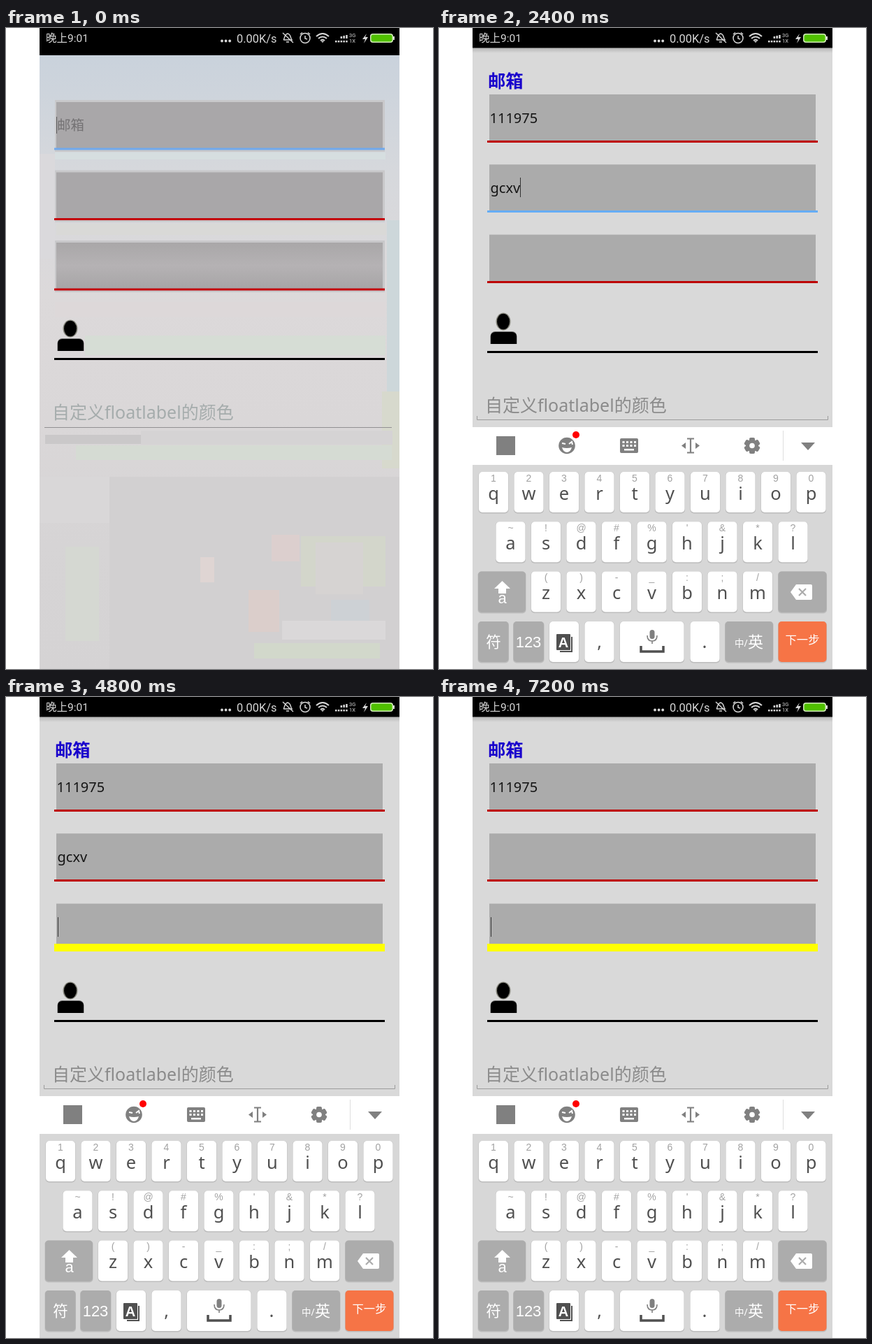
Animation of 611x917 px, one loop 8 s. Source, as an HTML page with a canvas:

```html
<!DOCTYPE html>
<html lang="zh-CN">
<head>
<meta charset="utf-8">
<style>
html, body { margin: 0; width: 100%; height: 100%; overflow: hidden; background: #fff; }
canvas { display: block; }
</style>
</head>
<body>
<canvas id="stage" width="611" height="917"></canvas>
<script>
const ctx = document.getElementById('stage').getContext('2d');
const CJK = '"Noto Sans CJK SC", "Noto Sans CJK", sans-serif';
const SANS = '"Noto Sans", ' + CJK;
const ROBOTO = 'Roboto, ' + CJK;
const ARIAL = '"Liberation Sans", ' + CJK;
const INK = '#505050', ICON = '#808080', KEY = '#acacac', ORANGE = '#f67446', BOARD = '#d7d7d7';
const RED = '#bd0000', BLUE = '#66adf4';
const STEP = 800;

const base = { speed: '0.00', fields: ['111975', '', ''], focus: 2 };
const steps = [
  { intro: true },
  { speed: '0.06', fields: ['11197', '', ''], focus: 0, keypad: true },
  { focus: 1, words: 'g' },
  { fields: ['111975', 'gcxv', ''], focus: 1 },
  { fields: ['111975', 'gcxv', ''], words: 'vvgb' },
  { fields: ['111975', 'gcxv', 'vvgb'], handle: true },
  { fields: ['111975', 'gcxv', ''] },
  { fields: ['111975', 'gc', ''], focus: 1 },
  { words: 'vvgb' },
  {}
].map(s => ({ ...base, ...s }));

function rect(x, y, w, h, color) {
  ctx.fillStyle = color;
  ctx.fillRect(x, y, w, h);
}
function round(x, y, w, h, r, color) {
  ctx.fillStyle = color;
  ctx.beginPath();
  ctx.roundRect(x, y, w, h, r);
  ctx.fill();
}
function disc(x, y, r, color, ry = r) {
  ctx.fillStyle = color;
  ctx.beginPath();
  ctx.ellipse(x, y, r, ry, 0, 0, 7);
  ctx.fill();
}
function path(d, color, width) {
  const p = new Path2D(d);
  ctx.fillStyle = ctx.strokeStyle = color;
  ctx.lineWidth = width || 1;
  width ? ctx.stroke(p) : ctx.fill(p);
}
function text(str, x, y, size, color, align = 'left', family = SANS, weight = 400) {
  ctx.font = `${weight} ${size}px ${family}`;
  ctx.textAlign = align;
  ctx.fillStyle = color;
  ctx.fillText(str, x, y);
}
function gradient(y0, y1, ...colors) {
  const g = ctx.createLinearGradient(0, y0, 0, y1);
  colors.forEach((c, i) => g.addColorStop(i / (colors.length - 1), c));
  return g;
}

function statusBar(speed, height) {
  const c = '#d8d8d8';
  rect(48, 0, 515, height, '#000');
  text('晚上9:01', 57, 20, 15.5, c, 'left', ROBOTO);
  for (let i = 0; i < 3; i++) disc(309 + i * 5.6, 18.5, 1.9, c);
  text(speed + 'K/s', 330, 20.5, 16.4, c, 'left', ROBOTO);
  path('M397 17H409C407 15 408 9 403 8C398 9 399 15 397 17M401 20H405M396 7L411 21', c, 1.4);
  path('M421 14.5a7 7 0 1 0 14 0a7 7 0 1 0 -14 0M428 11V15L431 16M421 9L424 6.5M435 9L432 6.5', c, 1.5);
  path('M444 12Q453 4 462 12M447 15Q453 10 459 15M450 18Q453 15.5 456 18', c, 2);
  path('M453 21L450.5 18.5H455.5Z', c);
  for (let i = 0; i < 5; i++) {
    rect(471 + i * 3.8, 18, 2.5, 2.5, c);
    if (i > 1) rect(471 + i * 3.8, 14 - i, 2.5, i + 1, c);
  }
  text('3G', 491, 13, 7.5, c, 'left', ROBOTO);
  text('1X', 491, 21, 7.5, c, 'left', ROBOTO);
  path('M516 8L510 16H514L512 22L518 13H514Z', c);
  round(521, 8, 33, 13, 4, '#d0e8b8');
  rect(554, 12, 2, 5, c);
  round(522.5, 9.5, 30, 10, 3, '#50c000');
}

function person(dy) {
  disc(92, 420 + dy, 10.5, '#85857b', 12.5);
  disc(92, 420 + dy, 9, '#000', 11.2);
  round(73.5, 434 + dy, 38, 18, [7, 7, 0, 0], '#6f6f6f');
  round(74, 435 + dy, 37, 17, [6, 6, 0, 0], '#000');
  rect(69, 462 + dy, 473, 3, '#000');
}

function intro() {
  rect(48, 30, 515, 887, gradient(30, 917, '#c9d2dc', '#d6d8dc', '#dcd9da', '#dad7d8', '#d6d4d5', '#d5d3d4'));
  const patches = [
    [48, 180, 22, 150, '#dad9dc'], [545, 275, 18, 255, '#cdd7da'], [70, 178, 473, 10, '#d6dee0'],
    [72, 280, 472, 16, '#d9d9d7'], [70, 392, 473, 22, '#ddd8d9'], [113, 440, 430, 28, '#d6ddd5'],
    [538, 520, 25, 110, '#d7d9cd'], [56, 582, 137, 13, '#cac8c9'], [193, 576, 360, 20, '#d5d3d4'],
    [100, 597, 452, 21, '#d5dbd3'], [148, 642, 415, 275, '#d2d0d1'], [48, 642, 100, 66, '#d9d7d8'],
    [85, 742, 48, 135, '#d5d8d2'], [278, 757, 20, 36, '#dfd5d3'], [422, 727, 121, 72, '#d3d6cb'],
    [443, 736, 68, 74, '#d6d3d2'], [380, 725, 40, 38, '#dccfce'], [347, 804, 44, 60, '#dbcecb'],
    [465, 818, 55, 36, '#cdd1d5'], [395, 848, 148, 27, '#dad8d9'], [355, 880, 180, 22, '#d2d8cb']
  ];
  patches.forEach(p => rect(...p));
  for (let i = 0; i < 3; i++) {
    const y = 106 + i * 100.5;
    rect(70, y - 3, 472, 74, '#c8c8ca');
    rect(72, y, 467, 66, i == 2 ? gradient(y, y + 66, '#a9a7a8', '#b5b2b4', '#a7a5a6') : '#a9a7a9');
    rect(69, y + 65.5, 473, 3, i ? '#c40008' : '#70a9ed');
  }
  text('邮箱', 73, 146, 19.5, '#747274');
  rect(72, 127, 1, 24, '#555');
  person(10);
  text('自定义floatlabel的颜色', 66, 559, 25, '#a5acac');
  rect(55, 571, 497, 1, '#929092');
  statusBar('0.00', 39);
}

function form({ fields, focus, handle }) {
  rect(48, 28, 515, 543, gradient(28, 36, '#b4b4b4', '#d9d9d9'));
  text('邮箱', 70, 85, 25.3, '#1900cc', 'left', CJK, 700);
  fields.forEach((value, i) => {
    const y = 95 + i * 100.3, active = focus == i;
    rect(72, y, 467, 67, '#ababab');
    if (active && i == 2) rect(69, 353, 473, 11, '#ff0');
    else rect(69, Math.round(y + 66), 473, 3, active ? BLUE : RED);
    const x = i ? 73.5 : 72.5;
    text(value, x, y + 41, 20, '#151515');
    if (active && !handle) rect(Math.round(x + ctx.measureText(value).width), Math.round(y + 19), 1, 28, '#333');
  });
  if (handle) {
    rect(115, 315, 2, 30, '#dd6a1c');
    disc(116, 353, 10, '#e0681f');
    path('M507 317L531 341M531 317L507 341', '#fff', 3);
  }
  person(0);
  text('自定义floatlabel的颜色', 66, 549, 25, '#8b8b8b');
  path('M54.5 555V560.5H556.5V555', '#9c9c9c', 1);
}

function toolbar() {
  round(82, 584, 27, 27, 0, ICON);
  disc(183, 597.5, 11.8, ICON);
  path('M176 594L181 595M186 595L190 592L191 596', '#fff', 2);
  path('M176 600Q183 602 190 600Q188 607 183 607Q178 607 176 600Z', '#fff');
  disc(196, 582, 5, '#f00');
  round(259, 587, 26, 21, 2, ICON);
  for (let i = 0; i < 8; i++) rect(262.5 + i % 4 * 5.5, 591 + (i >> 2) * 5, 3, 3, '#fff');
  rect(265, 602, 14, 2.5, '#fff');
  path('M355 587.5H365M360 588V607M355 607.5H365', ICON, 2.2);
  path('M353 593V602L347 597.5ZM367 593V602L373 597.5Z', ICON);
  ctx.save();
  ctx.translate(448, 597.5);
  for (let i = 0; i < 6; i++) {
    ctx.rotate(Math.PI / 3);
    round(-4, -11.5, 8, 8, 2, ICON);
  }
  ctx.restore();
  disc(448, 597.5, 9, ICON);
  disc(448, 597.5, 3.8, '#fff');
  path('M518 593H538L528 604Z', ICON);
}

function candidates(words) {
  const single = words == 'g';
  if (single) {
    rect(48, 540, 31, 31, '#c4c4c4');
    rect(48, 541, 30, 30, '#f6f6f6');
    text('g', 57, 565, 23, INK);
  } else rect(48, 571, 106, 54, '#e3e3e3');
  const list = single
    ? [['g', 72], ['gggg', 125], ['ggggg', 216], ['go', 321], ['good', 380], ['GO', 470]]
    : [['vvgb', 72], ['v', 169], ['V', 212]];
  list.forEach(([word, x], i) => text(word, x, 608, 26, i ? INK : ORANGE));
  rect(493, 571, 70, 54, '#fff');
  path('M523 589L533 598.5L523 608', single ? '#858585' : '#bbb', 2.6);
}

function key(x, y, w, h, color = '#fff') {
  round(x - .5, y, w + 1, h + 1.5, 5, '#bdbdbd');
  round(x, y, w, h, 5, color);
}
function backspace(x, y) {
  path(`M${x - 16} ${y}L${x - 8} ${y - 11}H${x + 13}Q${x + 15} ${y - 11} ${x + 15} ${y - 9}V${y + 9}Q${x + 15} ${y + 11} ${x + 13} ${y + 11}H${x - 8}Z`, '#fff');
  path(`M${x - 4} ${y - 5}l10 10m0 -10l-10 10`, KEY, 2.2);
}

function keypad() {
  key(54, 632, 76, 210);
  ['·', '/', '+', '−'].forEach((s, i) => {
    text(s, 92, [670, 711, 755, 801][i], 20, INK, 'center');
    rect(59, 681 + i * 45.3, 67, 1, '#d8d8d8');
  });
  for (let i = 0; i < 9; i++) {
    const x = 137 + i % 3 * 114.5, y = 632 + Math.floor(i / 3) * 72.8;
    key(x, y, 107, 64.5, i == 4 ? '#e3e3e3' : '#fff');
    text(i + 1, x + 53.5, y + 42, 30, INK, 'center');
  }
  for (let i = 0; i < 3; i++) key(480, 632 + i * 72.8, 77, 64.5, KEY);
  backspace(518, 665);
  text('*', 518, 751, 22, '#fff', 'center');
  text('#', 518, 819, 21, '#fff', 'center');
  key(54, 850, 76, 60, KEY);
  text('符', 92, 889, 24, '#fff', 'center');
  key(137, 850, 107.5, 60, KEY);
  path('M178 879L191 867V874Q207 875 208 893Q203 884 191 884V891Z', '#fff');
  key(251.5, 850, 107.5, 60);
  text('0', 305, 889, 30, INK, 'center');
  key(366, 850, 107.5, 60, KEY);
  path('M403 878V886H437V878', '#fff', 3.5);
  key(480, 850, 77, 60, ORANGE);
  text('下一步', 518.5, 887, 16.3, '#fff', 'center');
}

function qwerty(composing) {
  const rows = [
    ['qwertyuiop', '1234567890', 57],
    ['asdfghjkl', "~!@#%'&*?", 81.5],
    ['zxcvbnm', '()-_:;/', 132]
  ];
  rows.forEach(([letters, hints, left], r) => [...letters].forEach((letter, i) => {
    const x = left + i * 50.5, y = 635 + r * 71.2;
    key(x, y, 42, 58);
    text(hints[i], x + 21, y + 14, 14, '#a2a2a2', 'center', ARIAL);
    text(letter, x + 21, y + 40, 25.5, INK, 'center');
  }));
  key(56, 777.5, 68, 58.5, KEY);
  path('M90.500 791L102 802H96V809H85V802H79Z', '#fff');
  text('a', 90.5, 823, 22, '#fff', 'center', ARIAL);
  key(485.5, 777.5, 69, 58.5, KEY);
  backspace(519, 807);

  const y = 849;
  key(56, y, 43.5, 58, KEY);
  text('符', 78, 886, 21.5, '#fff', 'center');
  key(106.5, y, 43.5, 58, KEY);
  text('123', 128, 886, 22, '#fff', 'center', ARIAL);
  key(158, y, 42, 58);
  path('M173 892H190V871', INK, 2);
  round(168, 867, 20, 23, 1, INK);
  text('A', 178, 886, 20, '#fff', 'center', ARIAL, 700);
  key(208.5, y, 42, 58);
  text(',', 229.5, 887, 25, INK, 'center');
  key(259, y, 91.5, 58);
  round(301.500, 861, 7, 13, 3.5, ICON);
  path('M298 869Q298 877 305 877Q312 877 312 869M305 877V881', ICON, 1.6);
  path('M289 884V892H321V884', INK, 3.5);
  key(359.500, y, 42, 58);
  text('.', 380, 887, 26, INK, 'center');
  key(409.5, y, 68.5, 58, KEY);
  text('中/', 423, 885, 13.5, '#fff');
  text('英', 442, 886, 22, '#fff');
  key(485.5, y, 69, 58, ORANGE);
  if (composing) {
    path('M531 870V879.500H512', '#fff', 4);
    path('M503 879.5L514 872V887Z', '#fff');
  } else text('下一步', 520, 881, 16.3, '#fff', 'center');
}

function draw(now) {
  const state = steps[Math.floor(now / STEP) % steps.length];
  rect(0, 0, 611, 917, '#fff');
  if (state.intro) intro();
  else {
    form(state);
    statusBar(state.speed, 28.5);
    rect(48, 571, 515, 54, '#fff');
    state.words ? candidates(state.words) : toolbar();
    rect(492, 576, 1, 43, '#dedede');
    rect(48, 625, 515, 292, BOARD);
    state.keypad ? keypad() : qwerty(state.words);
  }
  requestAnimationFrame(tick);
}
const start = performance.now();
function tick() { draw(performance.now() - start); }
tick();
</script>
</body>
</html>
```
